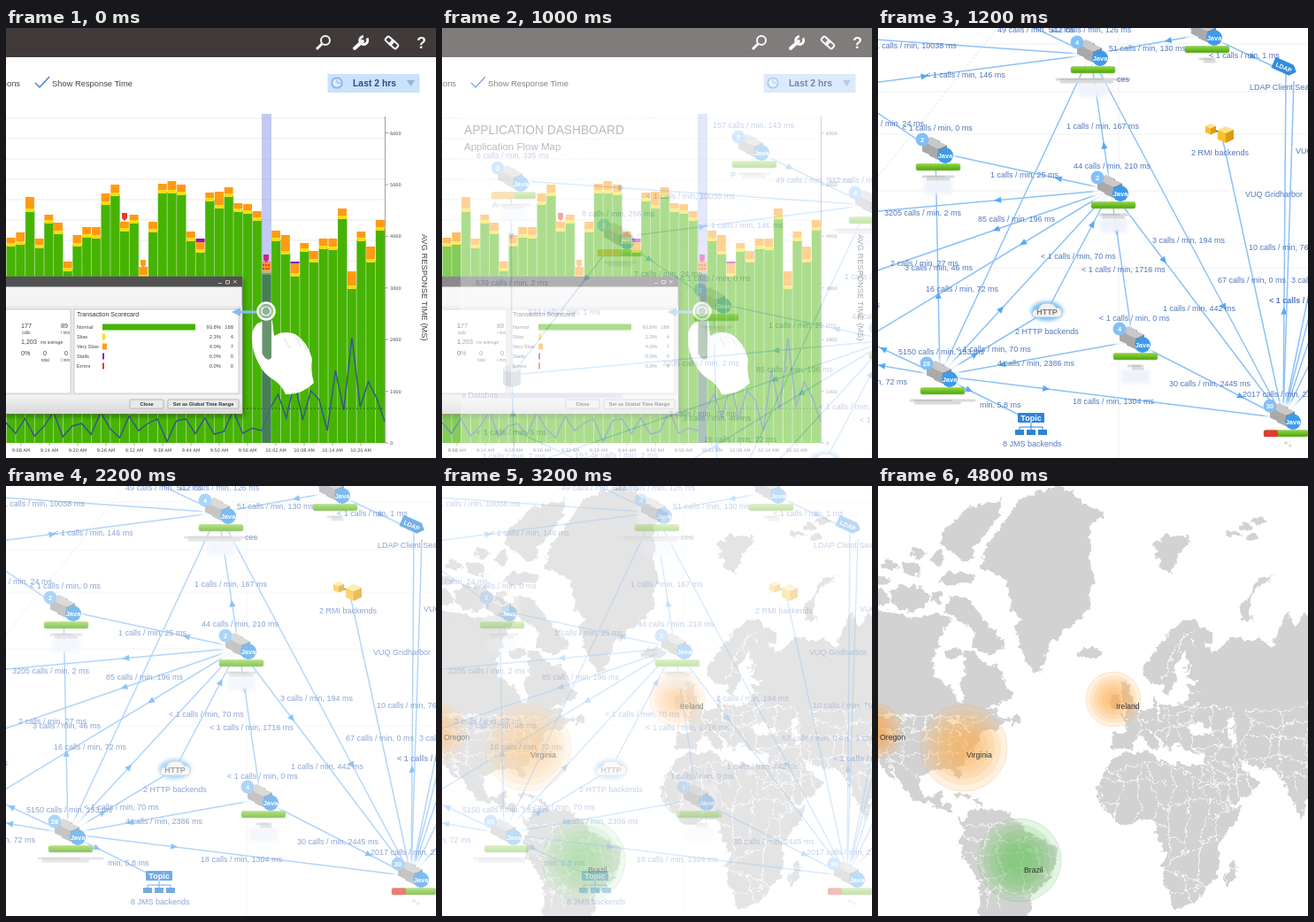
Recreate the animation shown at these times as an HTML page. Size 486 by 486 pixels, loop 5.2 s.

```html
<!DOCTYPE html>
<html lang="en">
<head>
<meta charset="utf-8">
<title>Monitoring views</title>
<style>
html, body { margin: 0; width: 100%; height: 100%; overflow: hidden; background: #fff; }
svg { display: block; width: 100vw; height: 100vh; }
text { font-family: "Liberation Sans", Arial, sans-serif; white-space: pre; }
.tick { font: 5px "DejaVu Sans", sans-serif; fill: #444; }
.flow text { font-size: 9px; fill: #5077bd; }
.flow .badge { font-size: 7.5px; font-weight: bold; fill: #fff; text-anchor: middle; }
.edge { stroke: #8cc2f8; stroke-width: 1.5; fill: none; }
.place { font-size: 8.7px; fill: #333; }
#chart, #panel, #scrolled, #world { animation: 5200ms step-end infinite; }
#chart { animation-name: chart; }
#panel { animation-name: panel; }
#scrolled { animation-name: scrolled; }
#world { animation-name: world; }
@keyframes chart { 0% { opacity: 1 } 19.2307% { opacity: .67 } 21.153% { opacity: .33 } 23.076%, 100% { opacity: 0 } }
@keyframes panel { 0% { opacity: 0 } 19.2307% { opacity: .33 } 21.153% { opacity: .67 } 23.076%, 100% { opacity: 0 } }
@keyframes scrolled { 0% { opacity: 0 } 23.076% { opacity: 1 } 42.307% { opacity: .67 } 61.538% { opacity: .33 } 80.769%, 100% { opacity: 0 } }
@keyframes world { 0% { opacity: 0 } 61.538% { opacity: .58 } 80.769%, 100% { opacity: 1 } }
</style>
</head>
<body>
<svg viewBox="0 0 486 486">
  <defs>
    <clipPath id="panelClip"><path d="M21 97H486V486H21Z"/></clipPath>
    <filter id="coast" x="-5%" y="-5%" width="110%" height="110%" color-interpolation-filters="sRGB">
      <feTurbulence type="fractalNoise" baseFrequency=".13" numOctaves="3" seed="4"/>
      <feDisplacementMap in="SourceGraphic" scale="11" xChannelSelector="R" yChannelSelector="G"/>
    </filter>
    <filter id="blur" x="-50%" y="-50%" width="200%" height="200%"><feGaussianBlur stdDeviation="2"/></filter>
    <linearGradient id="greenBar" x2="0" y2="1"><stop stop-color="#90d83c"/><stop offset="1" stop-color="#4ba50c"/></linearGradient>
    <linearGradient id="footer" x2="0" y2="1"><stop stop-color="#f4f4f4"/><stop offset="1" stop-color="#d8d8d8"/></linearGradient>
    <g id="flow" class="flow"></g>
  </defs>
  <g id="chart"></g>
  <g id="panel" clip-path="url(#panelClip)">
    <path d="M21 97H486V486H21Z" fill="#fff"/>
    <use href="#flow" x="242" y="170"/>
    <text x="25" y="120" font-size="13.75" fill="#333">APPLICATION DASHBOARD</text>
    <text x="25" y="138" font-size="11.5" fill="#333">Application Flow Map</text>
  </g>
  <g id="world"></g>
  <use id="scrolled" href="#flow"/>
</svg>
<script>
const byId = id => document.getElementById(id);
const rect = (x, y, w, h, fill, more = '') => `<rect x="${x}" y="${y}" width="${w}" height="${h}" fill="${fill}" ${more}/>`;
const circle = (x, y, r, fill, more = '') => `<circle cx="${x}" cy="${y}" r="${r}" fill="${fill}" ${more}/>`;
const path = (d, fill, more = '') => `<path d="${d}" fill="${fill}" ${more}/>`;
const line = (d, stroke, width = 1, more = '') => path(d, 'none', `stroke="${stroke}" stroke-width="${width}" ${more}`);
const text = (x, y, s, more = '') => `<text x="${x}" y="${y}" ${more}>${s.replace(/</g, '&lt;')}</text>`;
const sized = (size, fill = '#444', more = '') => `font-size="${size}" fill="${fill}" ${more}`;
const noise = (a, b = 0) => { const v = Math.sin(a * 12.99 + b * 78.23) * 43758.5; return v - Math.floor(v); };

const lime = '#46b302', yellow = '#f6de10', orange = '#ff9a14', red = '#e53c24', purple = '#8a19b4';
const marker = (x, y, fill) => path(`M${x - 3} ${y - 4}h6v6l-3 3l-3-3z`, fill);

function header() {
  const white = '#f5f5f5';
  return rect(0, 0, 486, 33, '#403b3a')
    + circle(361, 14, 5, 'none', `stroke="${white}" stroke-width="2"`) + line('M357 18l-6 6', white, 3)
    + line('M394 23l9-8', white, 4, 'stroke-linecap="round"') + line('M408 11.5a4.5 4.5 0 1 1-4-2', white, 3)
    + `<g transform="rotate(42 436 16.5)">${[428, 435].map(x => rect(x, 13.5, 9, 6, 'none', `rx="1.5" stroke="${white}" stroke-width="2"`)).join('')}</g>`
    + text(464, 23, '?', sized(18, white, 'font-weight="bold"'));
}

function toolbar() {
  return text(16, 66, 'Options', sized(9.35, '#444', 'text-anchor="end"'))
    + line('M33 62l5 5L49 55', '#3f7fc6', 1.4)
    + text(52, 66, 'Show Response Time', sized(9.35))
    + rect(363.5, 52, 104, 21, '#cce1fb')
    + circle(374, 62, 5.7, '#dcecff', 'stroke="#84b4ea" stroke-width="1.8"') + line('M374 58v4h4', '#84b4ea')
    + text(392, 66, 'Last 2 hrs', sized(10.4, '#2f4f80', 'font-weight="bold"'))
    + path('M453 59h9l-4.5 7z', '#92b5dd');
}

const barTops = [237, 231, 191, 238, 211, 220, 264, 234, 225, 225, 187, 177, 219, 211, 270, 219, 176, 173, 177, 230,
  242, 186, 185, 180, 198, 199, 207, 264, 229, 234, 267, 243, 252, 238, 238, 204, 275, 230, 247, 217];
const tallSlow = { 2: 15, 22: 17, 25: 9, 29: 20, 36: 18, 38: 16 };

function bars() {
  return barTops.map((top, i) => {
    const x = .6 + 10.7 * i, slow = tallSlow[i] || 8 + Math.round(4 * noise(i)), mid = top + slow;
    return rect(x, mid, 10.7, 469 - mid, '#a4d889') + rect(x, mid, 9.9, 469 - mid, lime)
      + rect(x, mid - 2, 9.9, 4, yellow) + rect(x, top, 9.9, slow - 2, orange);
  }).join('');
}

function plot() {
  let out = '';
  for (let y = 102; y < 469; y += 23) out += line(`M0 ${y}H428`, '#e6e6e6', .8);
  out += bars() + rect(214.6, 238, 10, 4, purple) + rect(321.6, 264, 10, 2.5, purple);
  out += marker(134, 213, red) + marker(155, 266, orange) + marker(316, 238, orange);
  let trend = 'M0 446';
  for (let i = 1; i < 27; i++) trend += `L${i * 10.7} ${450 + 13 * Math.sin(i * 2.3) - 5 * Math.cos(i * 1.3)}`;
  const peaks = [455, 430, 414, 441, 399, 443, 410, 420, 455, 387, 432, 350, 428, 400, 418, 445];
  peaks.forEach((y, i) => trend += `L${289 + i * 9.27} ${y}`);
  out += line(trend, '#34588a', 1.5) + line('M268 430H428', '#285728', 1, 'stroke-dasharray="2 2"');
  out += rect(289, 97, 11, 372, '#8393e9', 'opacity=".48"') + rect(289.5, 279, 10, 190, '#386b45', 'opacity=".65"')
    + rect(290, 265, 9, 9, orange) + line('M290 268h9M290 272h9', red, 2, 'stroke-dasharray="2 1"') + marker(294, 260, '#cf2484');
  out += line('M428.5 100V469', '#888', .8);
  for (let i = 0; i < 7; i++) {
    const y = 469 - i * 58.4;
    out += line(`M428 ${y}h4`, '#888', .8) + text(434, y + 2, String(i * 1000), 'class="tick"');
  }
  for (let i = 0; i < 13; i++) {
    const m = 8 + i * 6, label = `${9 + Math.floor(m / 60)}:${String(m % 60).padStart(2, '0')} AM`;
    out += line(`M${17 + 32 * i} 469v3`, '#888', .8) + text(17 + 32 * i, 479, label, 'class="tick" text-anchor="middle"');
  }
  return out + text(0, 0, 'AVG RESPONSE TIME (MS)', sized(9.3, '#444', 'transform="translate(470 233) rotate(90)"'));
}

function dialog() {
  const button = (x, w, label) => rect(x, 420, w, 10, '#eaeaea', 'rx="1" stroke="#aaa" stroke-width=".8"')
    + text(x + w / 2, 427, label, sized(5.6, '#333', 'text-anchor="middle" font-weight="bold"'));
  const stat = (x, y, value, unit, dx) => text(x, y, value, sized(7.2)) + text(x + dx, y + 7, unit, sized(4.6));
  const score = [['Normal', 105, lime, '93.8%', '168'], ['Slow', 3, yellow, '2.3%', '4'], ['Very Slow', 5, orange, '4.0%', '7'],
    ['Stalls', 2, purple, '0.0%', '0'], ['Errors', 2, red, '0.0%', '0']];
  return rect(-8, 284, 278, 156, '#000', 'opacity=".25" filter="url(#blur)"')
    + rect(-2, 281, 269, 155, '#f4f4f4', 'stroke="#777" stroke-width=".8"')
    + rect(0, 281, 267, 11.5, '#515151') + line('M240 288.5h4M248.5 285.5h4v3.5h-4zM257 285l3.5 3.5m0-3.5l-3.5 3.5', '#ddd', .8)
    + rect(0, 314, 267, 101, '#e9e9e9') + rect(-2, 318, 75, 95, '#fff', 'stroke="#ccc"') + rect(77, 318, 186, 95, '#fff', 'stroke="#ccc"')
    + rect(0, 415, 267, 21, 'url(#footer)') + button(140, 38, 'Close') + button(183, 80, 'Set as Global Time Range')
    + stat(17, 339, '177', 'calls', 1) + stat(62, 339, '89', '/ min', 0) + text(17, 357, '1,203', sized(7.2)) + text(39, 357, 'ms average', sized(4.8))
    + text(17, 370, '0%', sized(7.2)) + stat(42, 370, '0', 'total', -2) + stat(66, 370, '0', '/ min', -4)
    + text(80, 326, 'Transaction Scorecard', sized(7, '#333'))
    + score.map(([name, width, color, share, count], i) => {
      const y = 340 + 11 * i;
      return text(80, y, name, sized(5.6)) + rect(109, y - 5.5, width, 7, color)
        + text(243, y, share, sized(5.8, '#444', 'text-anchor="end"')) + text(257, y, count, sized(5.8, '#444', 'text-anchor="end"'));
    }).join('');
}

function pointer() {
  return path('M255 321l10-5v3.5h19v3h-19v3.5z', '#85bdf0')
    + path('M284 334Q278 340 278 350Q278 366 286 380Q291 391 303 398Q312 404 316 414Q334 415 348 401Q344 388 346 374Q341 355 327 346Q314 341 303 348L301 331Q299 328 294 330Z', '#fff')
    + path('M289.5 330h10.5v43q-5 5-10.5-5z', '#4c8053', 'opacity=".85"')
    + line('M314 350l7 12M327 349l6 11M336 356l4 9', '#ddd')
    + circle(294, 320, 9.5, '#fff', 'fill-opacity=".4" stroke="#fff" stroke-width="2.5"') + circle(294, 320, 5, 'none', 'stroke="#fff" stroke-width="1.2"');
}

byId('chart').innerHTML = header() + toolbar() + plot() + dialog() + pointer();

const at = {
  web: [-164, 2], cart: [-44, 67], pay: [108, -33], auth: [65, 140], hub: [240, 30], feed: [369, 7], core: [263, 183],
  app: [70, 393], job: [288, 354], data: [458, 441], db: [-163, 222], http: [191, 320], rmi: [390, 128], ldap: [461, 50],
  topic: [165, 440], west: [-200, 343], south: [-80, 391], below: [-160, 330], left: [-160, 285], mid: [-40, 374]
};

// "from to t": t places the arrowhead along the line
const links = `web hub .31|web db .29|pay hub .33|cart hub .34|cart db .3|cart auth .34|core auth .3|core db .3
core west .28|core south .29|app core .36|app auth .36|http core .72|core hub .33|hub app|hub data .695
core data .31|core job .28|job app .68|app data .31|job data .72|data ldap .31|data rmi|app http .33
app topic .35|app left .28|app mid .6|feed hub .32|feed ldap .6|below db .6`.split(/[|\n]/);

function edge(link) {
  const [from, to, t] = link.split(' '), [x1, y1] = at[from], [x2, y2] = at[to];
  const angle = Math.atan2(y2 - y1, x2 - x1) * 180 / Math.PI;
  return `<path class="edge" d="M${x1} ${y1}L${x2} ${y2}"/>`
    + (t ? path('M-4-3.5L4 0L-4 3.5Z', '#55a8f8', `transform="translate(${x1 + (x2 - x1) * t} ${y1 + (y2 - y1) * t}) rotate(${angle})"`) : '');
}

function fan() {
  let out = '<path class="edge" d="M458 441L470 60"/>';
  for (let i = 0; i < 5; i++) out += `<path class="edge" d="M458 441L490 ${285 + 30 * i}"/>`;
  return out;
}

function cube(x, y, s, [top, left, right]) {
  const h = s * .45, side = s * 1.2;
  return path(`M${x} ${y - s}l${s} ${h}l${-s} ${h}l${-s} ${-h}z`, top)
    + path(`M${x - s} ${y - s + h}l${s} ${h}v${side}l${-s} ${-h}z`, left)
    + path(`M${x + s} ${y - s + h}l${-s} ${h}v${side}l${s} ${-h}z`, right);
}

const gray = ['#c9c9c9', '#a9a9a9', '#858585'], gold = ['#ffe38a', '#fbc02c', '#e09a10'];

const smear = (x, y, w) => line(`M${x} ${y}h${w}M${x + 5} ${y + 3}h${w * .7}`, '#d9dadd', 3, 'stroke-linecap="round"')
  + line(`M${x + 4} ${y}h${w * .6}`, '#aaa', .8);

function tier(name, count, label = 34, warn = 0, warnColor = '#f7a521') {
  return `<g transform="translate(${at[name]})">`
    + rect(-20, -18, 42, 34, '#fff', 'opacity=".8" filter="url(#blur)"')
    + cube(-5, -7, 10, gray) + cube(3, -2, 10, gray)
    + circle(11, 4, 9, '#3e9beb') + text(11, 7, 'Java', 'class="badge"')
    + circle(-15, -14, 7.5, '#82c0f7') + text(-15, -11.5, count, 'class="badge"')
    + rect(-22, 13.5, 50, 7.5, 'url(#greenBar)', 'rx="2" stroke="#9ac27b" stroke-width=".6"')
    + (warn ? rect(-22, 13.5, warn, 7.5, warnColor, 'rx="2"') : '')
    + smear(3 - label / 2, 28, label) + '</g>';
}

function tiers() {
  return tier('web', '2', 34, 26) + tier('cart', '3', 34, 26) + tier('pay', '2') + tier('auth', '2') + tier('hub', '4', 82)
    + tier('feed', '2', 16) + tier('core', '2') + tier('app', '28', 72) + tier('job', '4', 16) + tier('data', '30', 1, 16, '#e23b31');
}

const call = ([x, y, count, ms]) => text(x, y, `${count} calls / min, ${ms} ms`);

const entryCalls = [
  [64, -57, 157, 143], [-203, -23, 6, 335], [-11, 23, '< 1', 10038], [-84, 43, 8, 256], [54, 56, '< 1', 146],
  [-204, 121, 639, 2], [-145, 154, 924, 1], [-25, 111, 7, 24], [27, 116, '< 1', 0], [135, 5, 49, 542],
  [195, 5, 112, 126], [-203, 290, '< 1', 5], [-197, 317, 3, 7], [-92, 316, '193.4k', 2]
];

const coreCalls = [
  [7, 212, 3205, 2], [14, 269, 2, 27], [30, 274, 3, 46], [54, 298, 16, 72], [127, 169, 1, 25], [113, 219, 85, 196],
  [213, 114, 1, 167], [221, 159, 44, 210], [184, 261, '< 1', 70], [230, 276, '< 1', 1716], [310, 243, 3, 194]
];

const backendCalls = [
  [322, 320, 1, 442], [250, 331, '< 1', 0], [329, 405, 30, 2445], [412, 417, 2017, 21], [220, 425, 18, 1304],
  [135, 382, 4, 2386], [88, 366, '< 1', 70], [23, 369, 5150, 153], [-44, 403, 1, 72], [261, 26, 51, 130],
  [374, 34, '< 1', 1], [419, 251, 10, 76], [384, 288, 67, 0], [467, 288, 3, 4]
];

function backends() {
  return '<ellipse cx="191" cy="320" rx="18" ry="11" fill="#78bff7" filter="url(#blur)"/>'
    + path('M178 327q-5-1-3-6q2-4 6-3q3-8 11-7q7 0 9 5q7 0 7 6q0 5-6 5z', '#f2f2f2', 'stroke="#b5c5d2"')
    + text(191, 324, 'HTTP', 'text-anchor="middle" style="fill:#777;font-weight:bold"')
    + cube(376, 114, 6, gold) + line('M382 116l6 4', '#333', 1.2) + cube(393, 120, 9, gold)
    + `<g transform="rotate(24 460 44)">${path('M446 38h22l6 6l-6 7h-22z', '#2e8de0')}${text(459, 47.5, 'LDAP', 'class="badge" style="font-size:7px"')}</g>`
    + rect(158, 435, 30, 11, '#2f82d6', 'rx="1"') + text(173, 443.5, 'Topic', 'class="badge" style="font-size:9px"')
    + line('M173 446v8M160 454v-3h26v3', '#2f82d6') + [155, 168, 181].map(x => rect(x, 454, 10, 6, '#2f82d6')).join('')
    + path('M-173 215v18q10 5 20 0v-18z', '#a8b0bb') + '<ellipse cx="-163" cy="215" rx="10" ry="4" fill="#d7dce3"/>'
    + line('M-180 246h140', '#d5ddef', 5, 'stroke-linecap="round"') + line('M-166 246h118', '#a9bbe2', 1);
}

function flow() {
  const grid = line('M0 18H486M0 72H486M0 120H486M0 184H486M0 271H486M272 0V486', '#ededed', .8)
    + line('M0 168L135 0M-220 20L0 -70M-220 130L-30 -70', '#ddd', .8, 'stroke-dasharray="3 2"');
  const halos = ['hub', 'auth', 'core', 'job', 'web'].map(n => rect(at[n][0] - 13, at[n][1] + 32, 32, 16, '#eef3fb', 'filter="url(#blur)"')).join('');
  return grid + links.map(edge).join('') + fan() + halos + tiers() + backends()
    + [entryCalls, coreCalls, backendCalls].map(group => group.map(call).join('')).join('')
    + text(115, 429, 'min, 5,8 ms') + text(442, 311, '< 1 calls / min', 'font-weight="bold"')
    + text(-220, 248, 'e Databas') + text(270, 61, 'ces') + text(84, -1, 'P') + text(-185, 33, 'A')
    + text(420, 70, 'LDAP Client Search') + text(354, 144, '2 RMI backends') + text(472, 142, 'VUQ')
    + text(415, 191, 'VUQ Gridharbor') + text(155, 346, '2 HTTP backends') + text(141, 473, '8 JMS backends');
}

byId('flow').innerHTML = flow();

const land = d => path(d, '#d2d2d2');

function island(x, y, rx, ry) {
  let d = '';
  for (let i = 0; i < 9; i++) {
    const a = i / 9 * 2 * Math.PI, k = .8 + .4 * noise(x + i, y);
    d += `${i ? 'L' : 'M'}${x + rx * k * Math.cos(a)} ${y + ry * k * Math.sin(a)}`;
  }
  return land(d + 'Z');
}

function northAmerica() {
  return land('M-9 135L40 150 68 143 82 152 70 170 62 200 64 217 84 230 94 246 97 238 92 225 100 212 96 188 106 186 122 200 134 203 146 228 152 240 122 252 134 252 132 260 150 263 134 274 120 276 110 292 92 320 94 330 90 332 84 320 66 320 50 325 46 332 48 345 53 352 62 350 74 341 70 358 84 362 84 372 96 376 96 382 78 366 36 352 14 318 8 308 20 335 14 328 -9 300Z')
    + path('M78 265l10-4 8 6-10 2zM90 270l3 12-5 2zM98 272l8 4-4 5z', '#fff');
}

function arctic() {
  return land('M80 126L100 126 120 150 141 175 142 184 125 190 104 182 110 165 75 140Z')
    + land('M72 52L95 30 115 20 141 14 136 33 118 60 105 70 110 80 98 86 72 66Z')
    + land('M412 152L410 138 430 105 449 101 432 112 420 128 422 153Z')
    + land('M310 65L325 56 350 55 352 66 340 75 332 99 320 92Z')
    + island(36, 126, 21, 15) + island(2, 125, 9, 9) + island(66, 126, 6, 8) + island(85, 189, 9, 6) + island(90, 105, 20, 7)
    + island(67, 82, 7, 9) + island(38, 93, 12, 8) + island(14, 90, 10, 6) + island(44, 76, 9, 7) + island(5, 107, 9, 5)
    + island(402, 54, 8, 4) + island(415, 46, 7, 5) + island(431, 40, 8, 4) + island(422, 57, 7, 4)
    + island(241, 189, 13, 7) + island(96, 349, 11, 2) + island(113, 357, 6, 3) + island(155, 265, 7, 5);
}

function greenland() {
  return land('M115 95L122 70 150 30 160 15 185 5 205 0 225 10 232 20 255 30 240 45 240 85 245 105 238 125 240 140 210 165 195 178 183 212 175 210 165 195 155 160 162 150 152 140 145 105 130 98Z');
}

function southAmerica() {
  return land('M96 380L104 368 114 364 145 368 162 383 168 392 203 407 204 418 193 445 176 460 166 495 112 495 116 465 112 445 94 415 92 400 98 390Z');
}

function northernEurope() {
  return land('M273 222L282 221 286 235 293 251 290 260 275 262 282 251 276 240Z') + island(267, 244, 6, 7)
    + land('M299 207L318 180 345 150 360 152 361 165 355 175 360 195 344 214 351 200 346 185 332 210 338 218 326 238 320 225 302 221Z');
}

function eurasia() {
  return land('M356 152L380 168 378 180 368 176 376 188 386 185 398 172 420 176 430 170 444 182 450 168 462 140 470 160 496 134 496 345 486 352 478 378 462 340 448 322 424 318 406 306 416 322 431 335 420 348 395 363 380 338 368 304 342 296 338 286 330 300 310 276 320 295 312 300 298 281 284 298 264 296 266 278 282 278 278 263 300 254 310 248 310 238 318 248 345 246 352 236 350 226 362 220 348 216 358 195Z')
    + path('M349 273L358 266 378 275 374 281 354 281Z', '#fff') + path('M395 264L404 260 401 275 406 290 400 296Z', '#fff');
}

function africa() {
  return land('M272 302L310 300 316 310 330 314 372 316 376 330 393 362 412 362 406 378 384 405 388 430 376 450 358 472 336 478 322 445 322 430 326 418 314 392 316 384 306 376 280 382 268 378 248 355 247 340 264 312Z')
    + land('M398 428L405 422 406 435 398 452 391 452 391 440Z');
}

// wobbly lattice of country or state borders with some edges left out
function borders(x, y, cols, rows, step, wobble) {
  const point = (i, j) => `${x + step * (i + wobble * (noise(i + x, j) - .5))} ${y + step * (j + wobble * (noise(j + y, i) - .5))}`;
  let d = '';
  for (let i = 0; i < cols; i++) for (let j = 0; j < rows; j++) {
    if (noise(i * 3 + x, j) < .82) d += `M${point(i, j)}L${point(i + 1, j)}`;
    if (noise(i, j * 5 + y) < .82) d += `M${point(i, j)}L${point(i, j + 1)}`;
  }
  return line(d, '#fff', 1);
}

function hotspot(x, y, radius, color) {
  let out = '';
  for (let i = 0; i < 6; i++) out += circle(x, y, radius * (1 - i * .14), color, 'opacity=".17"');
  return out + circle(x, y, radius, 'none', `stroke="${color}" stroke-opacity=".25"`);
}

const place = (x, y, name) => text(x, y, name, 'class="place"');

byId('world').innerHTML = '<g filter="url(#coast)">'
  + northAmerica() + arctic() + greenland() + southAmerica() + northernEurope() + eurasia() + africa()
  + line('M0 260H80L98 273 130 258M8 308L28 314 48 332', '#fff') + borders(0, 261, 8, 4, 14, .35) + borders(98, 376, 5, 5, 21, .9)
  + borders(250, 318, 8, 8, 20, .9) + borders(298, 234, 5, 4, 13, .9) + borders(362, 250, 7, 5, 20, .9)
  + line('M320 225L334 185 358 160M340 190L346 165', '#fff') + '</g>'
  + hotspot(-5, 277, 32, '#f6a03c') + hotspot(97, 296, 49, '#f9ab4d') + hotspot(266, 241, 31, '#fbac50') + hotspot(160, 423, 47, '#65c45c')
  + place(2, 287, 'Oregon') + place(100, 307, 'Virginia') + place(269, 252, 'Ireland') + place(165, 437, 'Brazil');
</script>
</body>
</html>
```
